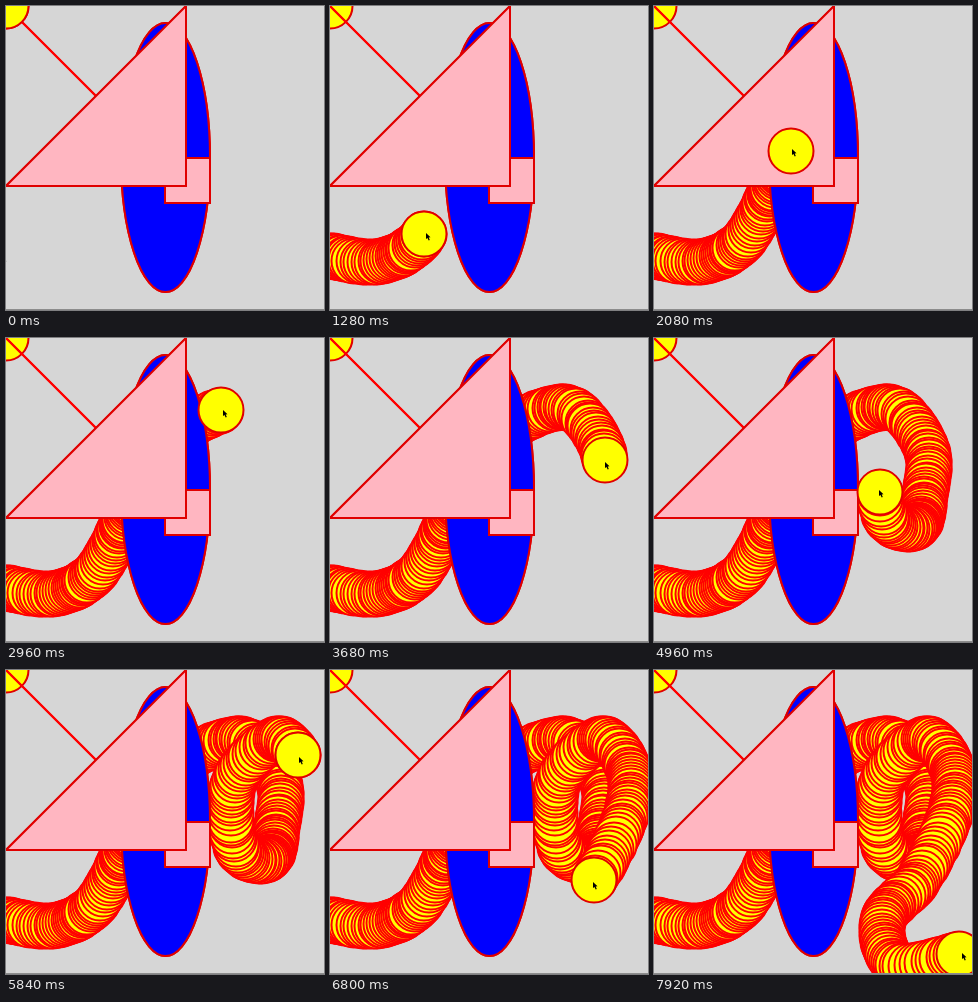
These frames come from a looping animation (318 px wide and 304 px high, 8 s). An HTML page with a canvas:

```html
<!DOCTYPE html>
<html lang="en">
<head>
<meta charset="utf-8">
<title>Circle trail</title>
<style>
  html, body { margin: 0; width: 100%; height: 100%; overflow: hidden; background: #d6d6d6; }
  canvas { display: block; }
</style>
</head>
<body>
<canvas id="stage" width="318" height="304"></canvas>
<script>
const ctx = document.getElementById('stage').getContext('2d');
const LOOP = 8000, STEP = 80;
const ENTER = 400;       // pointer enters the window
const POINTER_LEAD = 15; // the drawn circle lags the pointer slightly
const RED = '#f00', EDGE = '#e00000', YELLOW = '#ff0', PINK = '#ffb6c1', BLUE = '#00f';

// Pointer position at every KEY_SPAN ms, joined by a Catmull-Rom curve
const KEY_SPAN = 400;
const keys = [
  [-4, 251], [1, 250], [48, 256], [88, 236], [115, 190], [133, 153], [159, 110],
  [197, 80], [242, 71], [273, 113], [271, 157], [262, 189], [231, 178], [228, 112],
  [272, 69], [300, 104], [294, 150], [264, 210], [229, 250], [245, 295], [316, 281]
];

function pointerAt(t) {
  const last = keys.length - 1;
  const i = Math.min(Math.floor(t / KEY_SPAN), last - 1);
  const u = Math.min(t / KEY_SPAN - i, 1);
  const key = (n, axis) => keys[Math.max(0, Math.min(n, last))][axis];
  return [0, 1].map(axis => {
    const [a, b, c, d] = [-1, 0, 1, 2].map(n => key(i + n, axis));
    return Math.round(b + u / 2 * (c - a + u * (2 * a - 5 * b + 4 * c - d + u * (3 * (b - c) + d - a))));
  });
}

// The sketch repaints at an uneven rate
function random(n) {
  const x = Math.sin(n * 12.9898) * 43758.5453;
  return x - Math.floor(x);
}
const paintTimes = [];
for (let t = ENTER; t < LOOP; t += 14 + 22 * random(paintTimes.length)) paintTimes.push(t);

function paint(fill, stroke) {
  if (fill) {
    ctx.fillStyle = fill;
    ctx.fill();
  }
  ctx.strokeStyle = stroke;
  ctx.stroke();
}

function circle([x, y], stroke) {
  ctx.beginPath();
  ctx.arc(x, y, 22.5, 0, Math.PI * 2);
  paint(YELLOW, stroke);
}

function trace(points) {
  ctx.beginPath();
  points.forEach(([x, y]) => ctx.lineTo(x, y));
  ctx.closePath();
}

function shapes() {
  ctx.beginPath();
  ctx.ellipse(159.5, 151.5, 44.5, 134.5, 0, 0, Math.PI * 2);
  paint(BLUE, EDGE);
  trace([[0, 0], [90, 90]]);
  paint(null, RED);
  ctx.beginPath();
  ctx.rect(159, 152, 45, 45);
  paint(PINK, EDGE);
  trace([[0, 180], [180, 0], [180, 180]]);
  paint(PINK, EDGE);
}

function cursor([x, y]) {
  ctx.save();
  ctx.translate(x, y);
  trace([[0, 0], [0, 6], [1.5, 5], [2.7, 7.5], [3.8, 7], [2.7, 4.5], [4.5, 4.3]]);
  ctx.fillStyle = '#000';
  ctx.fill();
  ctx.restore();
}

function draw(t) {
  ctx.fillStyle = '#d6d6d6';
  ctx.fillRect(0, 0, 318, 304);
  ctx.lineWidth = 2;
  circle([0, 0], EDGE);
  paintTimes.filter(s => s <= t).forEach(s => circle(pointerAt(s), RED));
  // Repeated drawing hardens the edges
  for (let n = 0; n < 2; n++) shapes();
  circle(t < ENTER ? [0, 0] : pointerAt(t), EDGE);
  cursor(pointerAt(t + POINTER_LEAD));
  ctx.fillStyle = '#8c8c8c';
  ctx.fillRect(0, 303, 318, 1);
}

const start = performance.now();
let shown = -1;

function frame() {
  const t = Math.floor((performance.now() - start) % LOOP / STEP) * STEP;
  if (t !== shown) draw(shown = t);
  requestAnimationFrame(frame);
}
frame();
</script>
</body>
</html>
```
